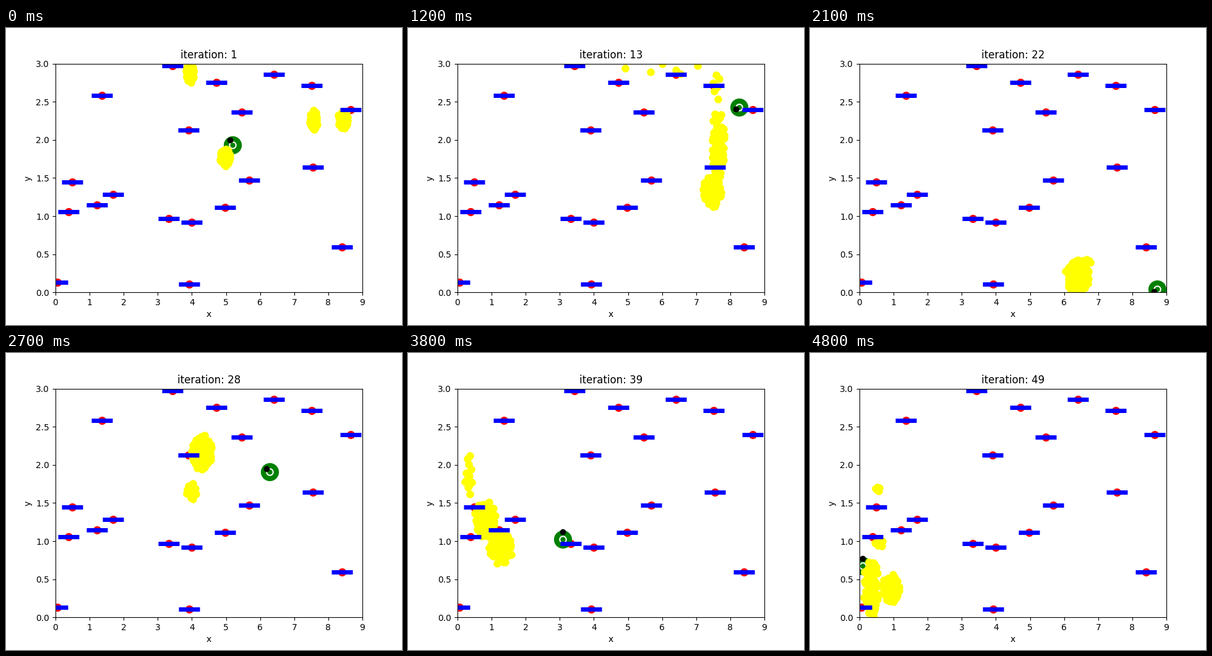
A matplotlib script that plays this animation: 640x480 px, repeating every 4.9 s.

```python
import numpy as np
import matplotlib.pyplot as plt
from matplotlib.animation import FuncAnimation

FRAMES, INTERVAL = 49, 100
DENSE, SPARSE = 138, 12
GOLDEN = np.pi * (3 - np.sqrt(5))

LANDMARKS = [
    (269, 61), (340, 88), (433, 75), (494, 93), (155, 109), (381, 136), (557, 132),
    (295, 165), (496, 225), (393, 246), (107, 249), (173, 269), (101, 297), (147, 286),
    (263, 308), (300, 314), (354, 290), (543, 354), (83, 411), (296, 414),
]

# step, robot x and y, heading in degrees, bow of the path towards the next key
KEYS = np.array([
    (0, 366, 189, 142, 0, 192),
    (7, 389, 181, 120, 0, 0),
    (12, 535, 128, 194, 20, 0),
    (21, 561, 422, 199, -21, -72),
    (27, 426, 192, 155, -60, -45),
    (38, 250, 301, 90, 0, 22),
    (48, 85, 344, 90, 0, 0),
], float)
STEPS, ROBOT, HEADING, BOW = KEYS[:, 0], KEYS[:, 1:3], KEYS[:, 3], KEYS[:, 4:]

# dense and sparse ellipses of particles at each key: centre, radii
CLOUDS = [
    ([(297, 73, 7, 13), (354, 209, 9, 14), (497, 149, 7, 15), (545, 149, 9, 15)], []),
    ([(350, 130, 13, 34)], [(304, 78, 17, 13)]),
    ([(501, 190, 10, 57), (491, 263, 15, 24)], [(410, 68, 66, 13), (498, 96, 6, 30)]),
    ([(433, 401, 18, 25)], [(440, 378, 18, 4)]),
    ([(316, 161, 16, 26)], [(299, 223, 10, 15)]),
    ([(124, 268, 16, 29), (149, 314, 18, 27)], [(98, 197, 7, 35)]),
    ([(99, 380, 12, 47), (131, 382, 14, 23)], [(109, 220, 4, 4), (112, 308, 7, 7)]),
]


def to_data(points):
    """Stage pixels (y down) to axes coordinates."""
    p = np.asarray(points, float)
    return (p[..., 0] - 80) * 9 / 496, (427.2 - p[..., 1]) * 3 / 369.6


def fill(ellipses, count, rng):
    """Deal particles out to the ellipses, each filled along a loose spiral."""
    i = np.arange(count)
    x, y, rx, ry = np.array(ellipses, float)[i % len(ellipses)].T
    k = i // len(ellipses)
    r = np.sqrt((k + 0.5) / (k[-1] + 1))
    wx, wy = rng.normal(0, 0.08, (2, count))
    return np.c_[x + rx * (r * np.cos(k * GOLDEN) + wx),
                 y + ry * (r * np.sin(k * GOLDEN) + wy)]


def make_cloud(dense, sparse, rng):
    pts = np.vstack([fill(dense, DENSE, rng), fill(sparse or dense, SPARSE, rng)])
    return pts[np.argsort(pts[:, 1])]


rng = np.random.default_rng(4)
PARTICLES = [make_cloud(dense, sparse, rng) for dense, sparse in CLOUDS]


def segment(t):
    k = min(np.searchsorted(STEPS, t, side="right") - 1, len(STEPS) - 2)
    return k, (t - STEPS[k]) / (STEPS[k + 1] - STEPS[k])


def travel(values, t):
    """Blend between keys, bowed sideways in the middle of the way."""
    k, u = segment(t)
    return (1 - u) * values[k] + u * values[k + 1] + BOW[k] * np.sin(np.pi * u)


def particles_at(t):
    pts = travel(PARTICLES, t)
    noise = np.random.default_rng(t).normal(0, 2.5, pts.shape)
    return pts + noise * np.sin(np.pi * segment(t)[1])


fig, ax = plt.subplots(figsize=(6.4, 4.8), dpi=100)
ax.set(xlim=(0, 9), ylim=(0, 3), xlabel="x", ylabel="y")
ax.set_xticks(range(10))
title = ax.set_title("iteration: 1")


def dots(color, size):
    return ax.plot([], [], "o", color=color, ms=size)[0]


ax.plot(*to_data(LANDMARKS), "o", color="red", ms=8.5)
body = [dots("green", 20), dots("white", 8), dots("green", 5)]
cloud = dots("yellow", 8)
nose = dots("black", 6)
ax.plot(*to_data(LANDMARKS), "_", color="blue", ms=25, mew=5)


def update(t):
    x, y = to_data(travel(ROBOT, t))
    for part in body:
        part.set_data([x], [y])
    a = np.radians(np.interp(t, STEPS, HEADING))
    nose.set_data([x + 0.1 * np.cos(a)], [y + 0.1 * np.sin(a)])
    cloud.set_data(*to_data(particles_at(t)))
    title.set_text(f"iteration: {t + 1}")
    return [*body, cloud, nose, title]


anim = FuncAnimation(fig, update, frames=FRAMES, interval=INTERVAL,
                     repeat=True, repeat_delay=0, blit=False)
plt.show()
```
